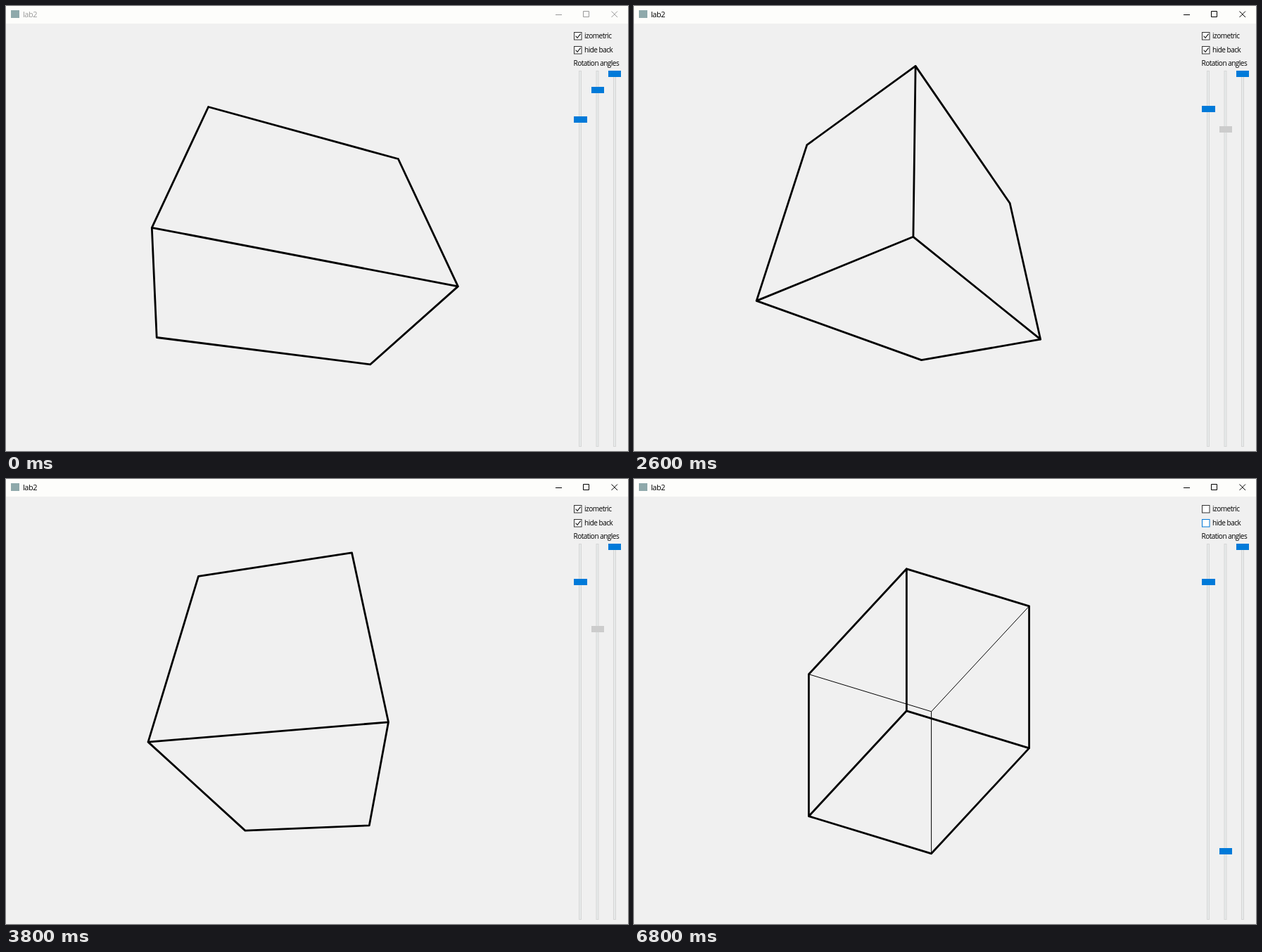
An HTML page for the animation above (8 s loop, 884 by 633 pixels).

```html
<!DOCTYPE html>
<html lang="en">
<head>
<meta charset="utf-8">
<title>lab2</title>
<style>
  html, body { margin: 0; width: 100%; height: 100%; overflow: hidden; background: #f0f0f0; }
  svg { display: block; width: 884px; height: 633px; }
  text { font: 10px "Open Sans", "Noto Sans", sans-serif; letter-spacing: -0.5px; }
  .title { font-size: 11px; }
</style>
</head>
<body>
<svg id="stage" viewBox="0 0 884 633" xmlns="http://www.w3.org/2000/svg"></svg>
<script>
const stage = document.getElementById('stage');
const LOOP = 8000, STEP = 100;

function add(tag, attrs, text) {
  const el = document.createElementNS('http://www.w3.org/2000/svg', tag);
  set(el, attrs);
  if (text) el.textContent = text;
  stage.appendChild(el);
  return el;
}
function set(el, attrs) {
  for (const key in attrs) el.setAttribute(key, attrs[key]);
}

// Window frame
add('rect', { width: 884, height: 633, fill: '#f0f0f0' });
add('rect', { width: 884, height: 25, fill: '#fdfdfb' });
add('rect', { x: 7, y: 6, width: 12, height: 11, fill: '#8fa9ab' });
const title = add('text', { x: 24, y: 16, class: 'title' }, 'lab2');
const buttons = add('path', {
  d: 'M781 12.5H790M820.5 7.5h8v8h-8zM860.5 7.5l8.5 8.5M869 7.5l-8.5 8.5',
  fill: 'none', 'stroke-width': 1
});

// Box drawing
const back = add('path', { fill: 'none', stroke: '#000', 'stroke-width': 1 });
const front = add('path', {
  fill: 'none', stroke: '#000', 'stroke-width': 2.8, 'stroke-linecap': 'round'
});

// Side panel
function checkbox(y, label) {
  const box = add('rect', { x: 807.5, y: y + 0.5, width: 10.5, height: 10.5 });
  const tick = add('path', {
    d: `M809.5 ${y + 5.6}l2.6 2.7 4.4-5.6`, fill: 'none', stroke: '#222', 'stroke-width': 1.2
  });
  add('text', { x: 822, y: y + 9 }, label);
  return (checked, state) => {
    set(box, BOX_LOOK[state]);
    set(tick, { visibility: checked ? 'visible' : 'hidden' });
  };
}
function slider(x, width, mid) {
  add('rect', {
    x: mid - 1.5, y: 92.5, width: 3, height: 534, fill: '#e7eaea', stroke: '#d6d6d6'
  });
  const knob = add('rect', { x, width, height: 9 });
  return (angle, fill) => set(knob, { y: Math.floor(92 + angle * 1.4535), fill });
}

const BOX_LOOK = {
  idle: { fill: '#fff', stroke: '#333' },
  fading: { fill: '#fff', stroke: '#1a5585' },
  hover: { fill: '#fff', stroke: '#0078d7' },
  pressed: { fill: '#cce4f7', stroke: '#005499' }
};
const BLUE = '#007ad9', DARK = '#171717', GRAY = '#ccc', MIX = '#0c4878';

const izometric = checkbox(37, 'izometric');
const hideBack = checkbox(57, 'hide back');
add('text', { x: 806.5, y: 85 }, 'Rotation angles');
const knobX = slider(807, 19, 816);
const knobY = slider(832, 18, 840.5);
const knobZ = slider(856, 18, 865);

// Drags, one angle per step, then the last value holds
const dragX = { start: 1000, angles: [49, 68, 88, 98, 100, 92, 79, 63, 47, 36, 35] };
const dragY = {
  start: 2300,
  angles: [16, 19, 34, 55, 78, 101, 122, 140, 152, 158, 155,
           146, 132, 115, 98, 81, 66, 57, 80, 160, 237, 298]
};
function angleAt(drag, first, t) {
  const i = Math.floor((t - drag.start) / STEP);
  return i < 0 ? first : drag.angles[Math.min(i, drag.angles.length - 1)];
}

// Latest value of a [time, value] list
function at(t, list) {
  let value = list[0][1];
  for (const [time, v] of list) if (t >= time) value = v;
  return value;
}

const HALF = [148, 123.3, 98.65], EYE = 438, CX = 405, CY = 330.3;
const SIGNS = [-1, 1];

function drawBox(ax, ay, perspective, hide) {
  const rad = Math.PI / 180;
  const c = Math.cos(ax * rad), s = Math.sin(ax * rad);
  const cy = Math.cos(ay * rad), sy = Math.sin(ay * rad);
  const axes = [[cy, sy * s, -sy * c], [0, c, s], [sy, -cy * s, cy * c]];

  const project = v => {
    const [x, y, z] = [0, 1, 2].map(k =>
      axes.reduce((sum, a, i) => sum + a[k] * HALF[i] * v[i], 0));
    const f = perspective ? EYE / (EYE - z) : 1;
    return (CX + x * f).toFixed(1) + ' ' + (CY + y * f).toFixed(1);
  };
  const visible = (i, sign) =>
    axes[i][2] * sign * EYE > (perspective ? HALF[i] : 0);

  let thick = '', thin = '';
  for (let i = 0; i < 3; i++) {
    const j = (i + 1) % 3, k = (i + 2) % 3;
    for (const p of SIGNS) for (const q of SIGNS) {
      const a = [], b = [];
      a[i] = -1; b[i] = 1;
      a[j] = b[j] = p;
      a[k] = b[k] = q;
      const line = `M${project(a)}L${project(b)}`;
      if (visible(j, p) || visible(k, q)) thick += line;
      else if (!hide) thin += line;
    }
  }
  set(front, { d: thick });
  set(back, { d: thin });
}

function render(time) {
  const t = Math.floor((time % LOOP) / STEP) * STEP;
  const active = t >= 1000;
  set(title, { fill: active ? '#000' : '#999' });
  set(buttons, { stroke: active ? '#000' : '#999' });

  const ax = angleAt(dragX, 45, t), ay = angleAt(dragY, 16, t);
  const iso = t < 5100, hide = t < 6700;
  knobX(ax, at(t, [[0, BLUE], [300, MIX], [400, '#15212b'], [600, DARK], [1000, GRAY], [2100, BLUE]]));
  knobY(ay, at(t, [[0, BLUE], [2300, DARK], [2400, GRAY], [4500, BLUE]]));
  knobZ(0, BLUE);
  izometric(iso, at(t, [[0, 'idle'], [4700, 'hover'], [5000, 'pressed'], [5200, 'hover'],
                        [6000, 'fading'], [6100, 'idle']]));
  hideBack(hide, at(t, [[0, 'idle'], [6300, 'fading'], [6400, 'hover'], [6600, 'pressed'],
                        [6800, 'hover']]));
  drawBox(ax, ay, iso, hide);
}

const begin = performance.now();
function tick() {
  render(performance.now() - begin);
  requestAnimationFrame(tick);
}
tick();
</script>
</body>
</html>
```
